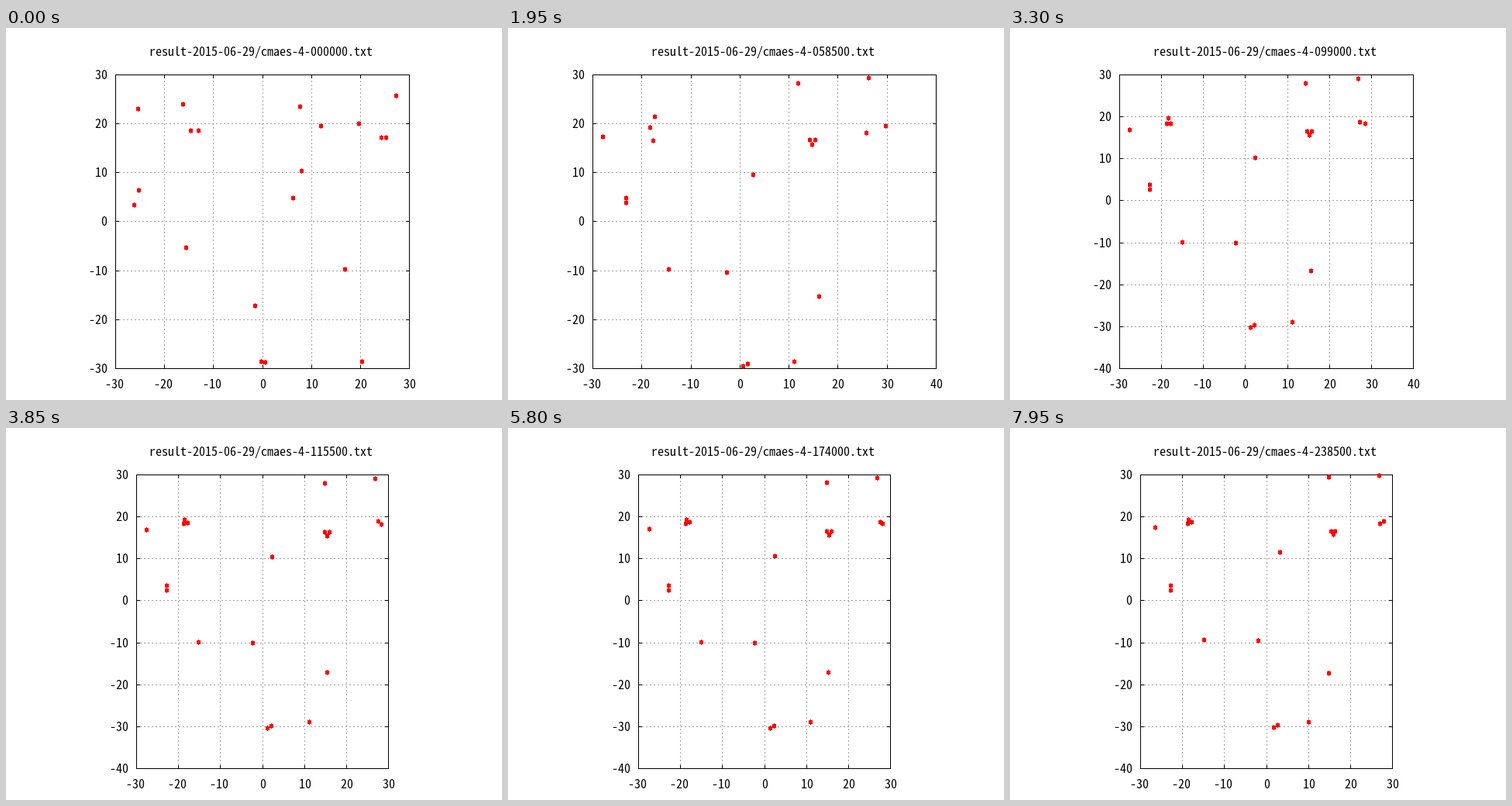
An HTML page that plays this animation: 640 by 480 pixels, repeating every 8000 ms.

```html
<!DOCTYPE html>
<html lang="en">
<head>
<meta charset="utf-8">
<title>Scatter plot</title>
<style>
  html, body { margin: 0; width: 100%; height: 100%; overflow: hidden; background: #fff; }
  svg { display: block; width: 640px; height: 480px; }
  text { font: 16px "Noto Sans Mono CJK JP", "Noto Sans Mono", monospace; white-space: pre; }
  path { fill: none; stroke: #000; shape-rendering: crispEdges; }
  #grid { stroke: #a0a0a0; stroke-dasharray: 2 3; }
  #dots path { fill: #f00; stroke: none; }
</style>
</head>
<body>
<svg viewBox="0 0 640 480">
  <path id="grid"/>
  <path id="axes"/>
  <g id="labels"></g>
  <text id="title" x="329" y="36" text-anchor="middle"></text>
  <g id="dots"></g>
</svg>
<script>
const LOOP = 8000, STEP = 50;
const TOP = 60, BOTTOM = 439, CENTER = 330.5, MIN_X = -30, MAX_Y = 30;
const $ = id => document.getElementById(id);

function add(parent, tag, attrs) {
  const el = document.createElementNS("http://www.w3.org/2000/svg", tag);
  for (const k in attrs) el.setAttribute(k, attrs[k]);
  return parent.appendChild(el);
}

// The axes grow or shrink in tens to hold all dots; both share one scale
function layout(from, maxX, minY) {
  const scale = (BOTTOM - TOP) / (MAX_Y - minY);
  const half = (maxX - MIN_X) * scale / 2;
  const left = Math.round(CENTER - half), right = Math.round(CENTER + half);
  return {
    from, maxX, minY, left, right,
    x: v => Math.round(left + (v - MIN_X) * (right - left) / (maxX - MIN_X)),
    y: v => BOTTOM - Math.round((v - minY) * scale)
  };
}
const layouts = [layout(0, 30, -30), layout(600, 40, -30), layout(2650, 40, -40), layout(3500, 30, -40)];

// Dots rush from their starts to a meeting point, ease to a rest, then drift.
// Dots that share a meeting point keep about one unit apart, in a ring.
const dots = [];
function swarm(starts, meet, rest, drift = [0, 0], turn = 90) {
  const n = starts.length, radius = n > 1 ? .53 / Math.sin(Math.PI / n) : 0;
  starts.forEach((start, i) => {
    const a = turn * Math.PI / 180 + i * 2 * Math.PI / n;
    const ring = [radius * Math.cos(a), radius * Math.sin(a)];
    const el = add($("dots"), "path", { d: "M-2-2H0V-3H1V-2H3V3H1V4H0V3H-2Z" });
    dots.push({ el, start, meet: meet.map((v, k) => v + ring[k]), rest: rest.map((v, k) => v + ring[k]), drift });
  });
}
swarm([[-25.4, 23]], [-28.4, 17.8], [-27.6, 16.9], [1.1, .5]);
swarm([[-16.2, 24]], [-15.9, 23.7], [-18.6, 19.3]);
swarm([[-14.6, 18.6]], [-17.7, 20.2], [-18.8, 18.3]);
swarm([[-13.1, 18.6]], [-17.4, 14], [-17.9, 18.7]);
swarm([[-25.2, 6.4], [-26.2, 3.4]], [-23.6, 5.9], [-22.8, 3]);
swarm([[-15.6, -5.3]], [-13.7, -9.6], [-15.2, -9.9], [.4, .5]);
swarm([[-1.5, -17.2]], [-3.1, -10.8], [-2.3, -10.1], [.4, .5]);
swarm([[-.2, -28.6], [.6, -28.7]], [.5, -28.3], [1.7, -30.1], [.6, .2], 211);
swarm([[20.3, -28.6]], [10.8, -28.1], [11.2, -28.9], [-1.1, 0]);
swarm([[16.9, -9.7]], [17.1, -13.1], [15.4, -17.1], [-.6, -.2]);
swarm([[6.3, 4.8]], [3.2, 8.8], [2.3, 10.4], [.9, 1.1]);
swarm([[8, 10.4], [19.7, 20], [12, 19.6]], [14.1, 16.8], [15.4, 16.1], [.5, .2], 270);
swarm([[7.7, 23.5]], [8.4, 28.4], [14.9, 28], [0, 1.5]);
swarm([[24.3, 17.2]], [23.7, 17.2], [27.6, 18.9], [-.5, -.5]);
swarm([[25.2, 17.2]], [31.3, 21.1], [28.3, 18.2], [-.4, .7]);
swarm([[27.3, 25.7]], [25.6, 29.5], [26.9, 29.1], [0, .7]);

const phase = (t, from, to) => Math.min(1, Math.max(0, (t - from) / (to - from)));
const easeOut = (u, power) => 1 - (1 - u) ** power;

function place({ start, meet, rest, drift }, t) {
  const rush = easeOut(phase(t, 0, 900), 1.5);
  const settle = easeOut(phase(t, 900, 4250), 2);
  const wander = phase(t, 5100, 7950) ** 1.3;
  return start.map((v, k) => v + (meet[k] - v) * rush + (rest[k] - meet[k]) * settle + drift[k] * wander);
}

function drawAxes(l) {
  const { left, right } = l, mid = n => n + .5;
  let grid = "", axes = `M${mid(left)} ${mid(TOP)}H${mid(right)}V${mid(BOTTOM)}H${mid(left)}Z`;
  $("labels").replaceChildren();
  const label = (n, x, y, anchor) =>
    add($("labels"), "text", { x, y, "text-anchor": anchor }).textContent = n;

  for (let n = MIN_X; n <= l.maxX; n += 10) {
    const x = l.x(n);
    if (n > MIN_X && n < l.maxX) grid += `M${mid(x)} ${BOTTOM + 1}V${TOP}`;
    axes += `M${mid(x)} ${BOTTOM}v-4M${mid(x)} ${TOP + 1}v4`;
    label(n, x + (n < 0 ? -1 : 1), 465, "middle");
  }
  for (let n = l.minY; n <= MAX_Y; n += 10) {
    const y = l.y(n);
    if (n > l.minY && n < MAX_Y) grid += `M${left} ${mid(y)}H${right}`;
    axes += `M${left + 1} ${mid(y)}h4M${right} ${mid(y)}h-4`;
    label(n, left - 10, y + 6, "end");
  }
  $("grid").setAttribute("d", grid);
  $("axes").setAttribute("d", axes);
}

let shown = null;
function render(ms) {
  const step = Math.floor(ms % LOOP / STEP), t = step * STEP;
  const l = layouts.filter(o => o.from <= t).pop();
  if (l !== shown) drawAxes(shown = l);
  $("title").textContent = `result-2015-06-29/cmaes-4-${String(step * 1500).padStart(6, "0")}.txt`;
  for (const d of dots) {
    const [x, y] = place(d, t);
    d.el.setAttribute("transform", `translate(${l.x(x)} ${l.y(y)})`);
  }
}

const begin = performance.now();
function tick() {
  render(performance.now() - begin);
  requestAnimationFrame(tick);
}
tick();
</script>
</body>
</html>
```
